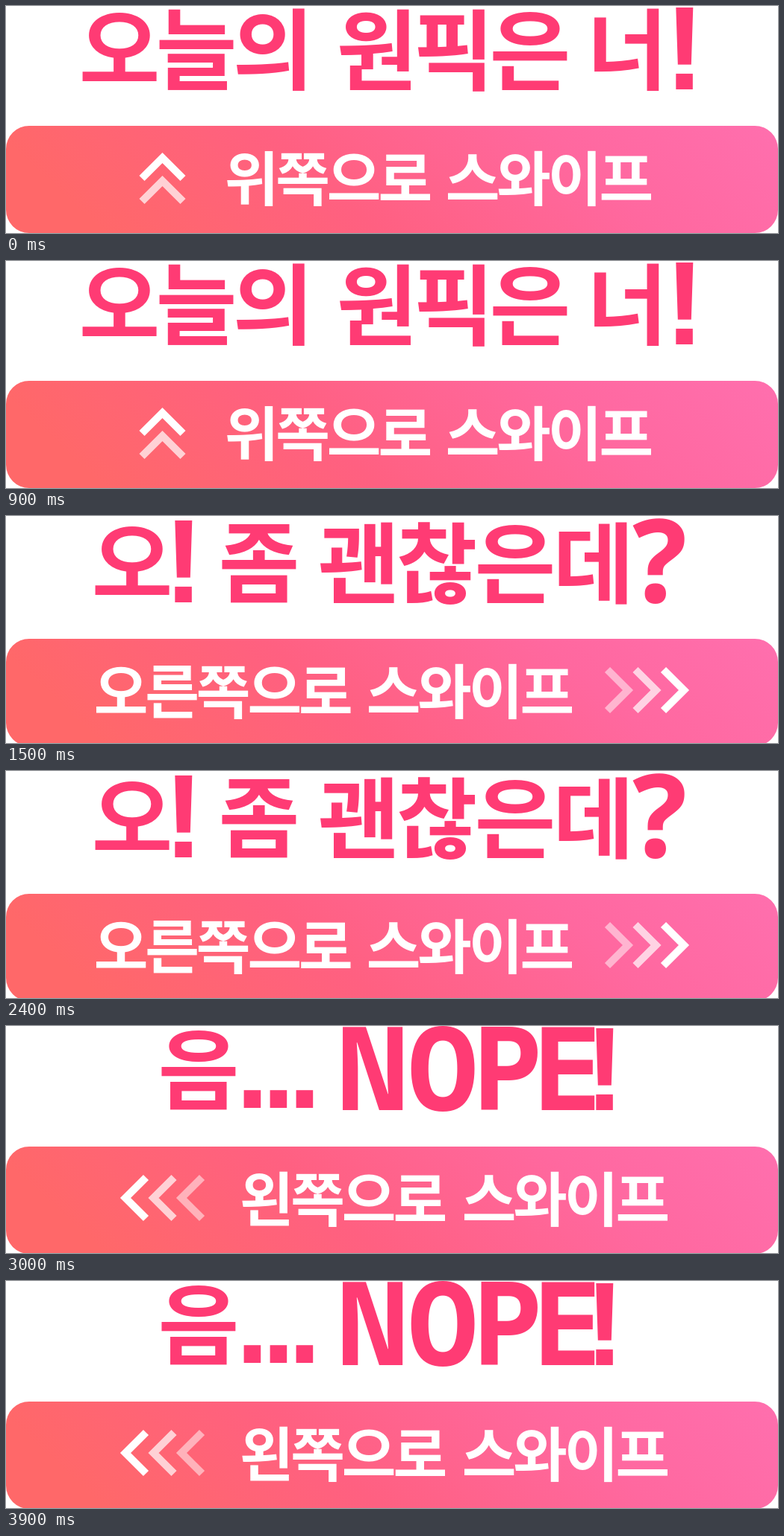
Animation of 1034 by 305 pixels, one loop 4.5 s. Source, as an HTML page:

```html
<!DOCTYPE html>
<html lang="ko">
<head>
<meta charset="utf-8">
<title>스와이프</title>
<style>
  html, body { margin: 0; width: 100%; height: 100%; overflow: hidden; background: #fff; }
  svg { display: block; width: 100%; height: 100%; }
  text { text-anchor: middle; font-family: "Noto Sans CJK KR", "Noto Sans CJK", sans-serif; font-weight: 900; }
  .title, .latin, .mark { fill: #ff3b74; }
  .title { font-size: 118px; }
  .latin { font-family: "Noto Sans Mono", monospace; font-size: 157px; font-weight: 800; }
  .mark { font-family: "Liberation Sans", Arial, sans-serif; font-size: 160px; font-weight: 700; }
  .label { font-size: 79px; fill: #fff; }
  .chevron { fill: none; stroke: #fff; stroke-width: 10; }
</style>
</head>
<body>
<svg id="stage" viewBox="0 0 1034 305">
  <defs>
    <linearGradient id="pink" x1="0" y1=".15" x2="1" y2="0">
      <stop offset="0" stop-color="#ff6869"/>
      <stop offset=".35" stop-color="#ff6081"/>
      <stop offset=".7" stop-color="#ff689f"/>
      <stop offset="1" stop-color="#ff6fae"/>
    </linearGradient>
  </defs>
</svg>
<script>
const SCENE_MS = 1500;

// Each character is centred on its own x, a fixed pitch apart.
function word(style, chars, x, y, pitch = 0) {
  const centres = [...chars].map((_, i) => x + i * pitch).join(" ");
  return `<text class="${style}" x="${centres}" y="${y}">${chars}</text>`;
}

const title = (chars, x, y, pitch) => word("title", chars, x, y, pitch);
const latin = (chars, x, y) => word("latin", chars, x, y);
const mark = (chars, x, y, pitch) => word("mark", chars, x, y, pitch);
const label = (chars, x, y) => word("label", chars, x, y, 68.6);

const button = y => `<rect y="${y}" width="1034" height="144" rx="31" fill="url(#pink)"/>`;

const chevron = (x, y, angle, opacity) =>
  `<path class="chevron" d="M-27.5 27.5 0 0 27.5 27.5" opacity="${opacity}"
    transform="translate(${x} ${y}) rotate(${angle})"/>`;

const scenes = [
  [
    title("오늘의", 152, 103, 103), title("원픽은", 497, 104, 102.5), title("너", 832, 103),
    mark("!", 909, 112),
    button(161),
    chevron(209.5, 204, 0, 1), chevron(209.5, 235, 0, .7),
    label("위쪽으로", 329, 262), label("스와이프", 625, 262)
  ],
  [
    title("오", 169, 108), mark("!", 238, 116),
    title("좀", 339, 107), title("괜찮은데", 472, 108, 105), latin("?", 874, 116),
    button(165),
    label("오른쪽으로", 154, 266), label("스와이프", 519, 266),
    chevron(833, 234, 90, .5), chevron(870.5, 234, 90, .7), chevron(908, 234, 90, 1)
  ],
  [
    title("음", 258, 103), mark("...", 330, 110, 35),
    latin("N", 491, 113), latin("O", 585, 113), latin("P", 671, 113), latin("E", 752, 113),
    mark("!", 802, 113),
    button(162),
    chevron(160, 231, -90, 1), chevron(197.5, 231, -90, .7), chevron(235, 231, -90, .5),
    label("왼쪽으로", 349, 263), label("스와이프", 647, 263)
  ]
];

const stage = document.getElementById("stage");
stage.insertAdjacentHTML("beforeend", scenes.map(parts => `<g class="scene">${parts.join("")}</g>`).join(""));
const groups = stage.querySelectorAll(".scene");
const start = performance.now();

function draw() {
  const current = Math.floor((performance.now() - start) / SCENE_MS) % groups.length;
  groups.forEach((group, i) => group.style.display = i === current ? "" : "none");
  requestAnimationFrame(draw);
}
draw();
</script>
</body>
</html>
```
